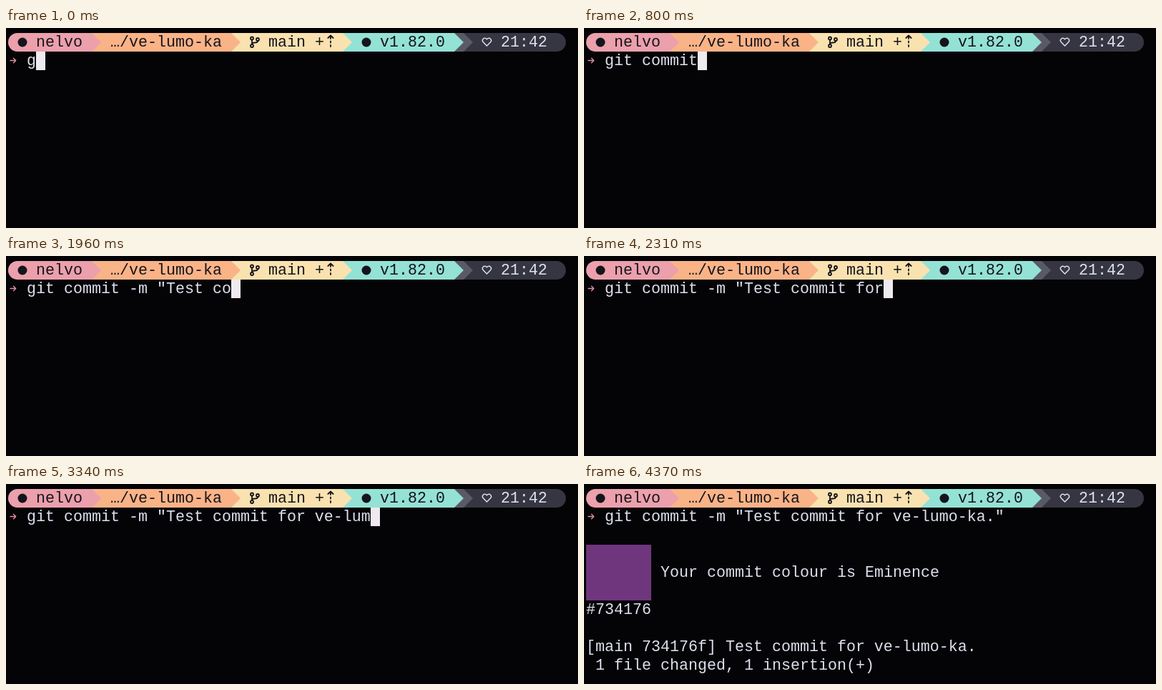
Write an HTML page that moves like this. It is 800 px wide and 280 px high and loops after 8000 ms.

```html
<!DOCTYPE html>
<html lang="en">
<head>
<meta charset="utf-8">
<title>Terminal commit</title>
<style>
  html, body { margin: 0; width: 100%; height: 100%; overflow: hidden; background: #040406; }
  svg { display: block; width: 100%; height: 100%; }
  text { font: 21.663px "Liberation Mono", monospace; white-space: pre; fill: #dde0ee; }
  .dark text { fill: #15141c; }
  .line { fill: none; stroke-width: 1.8; stroke-linecap: round; stroke-linejoin: round; }
</style>
</head>
<body>
<svg id="stage" viewBox="0 0 800 280" xmlns="http://www.w3.org/2000/svg"></svg>
<script>
const LOOP = 8000, CELL = 13, ROW = 26, LEFT = 3, TOP = 7;
const INK = "#15141c", PALE = "#dde0ee";
const USER = "nelvo", PROJECT = "ve-lumo-ka";
const MESSAGE = `Test commit for ${PROJECT}.`;
const COMMAND = `git commit -m "${MESSAGE}"`;

const stage = document.getElementById("stage");
const colX = c => LEFT + c * CELL;
const rowY = r => TOP + r * ROW;

function add(parent, tag, attrs, content) {
  const el = document.createElementNS("http://www.w3.org/2000/svg", tag);
  for (const key in attrs) el.setAttribute(key, attrs[key]);
  if (content) el.textContent = content;
  parent.appendChild(el);
  return el;
}
const group = cls => add(stage, "g", cls ? { class: cls } : {});
const write = (parent, col, row, s) =>
  add(parent, "text", { x: colX(col), y: rowY(row) + 19 }, s);
const line = (parent, d, stroke) => add(parent, "path", { d, stroke, class: "line" });

// Prompt bar: later segments lie underneath the arrow tips of earlier ones.
function drawBar() {
  const bar = group("dark");
  const mid = TOP + ROW / 2, end = TOP + ROW;
  add(bar, "path", {
    fill: "#363542",
    d: `M${colX(49)} ${TOP}H${colX(59)}a13 13 0 0 1 0 26H${colX(49)}Z`
  });
  const segments = [
    [48, 49, "#5a5a66"], [36, 48, "#94e2d5"], [24, 36, "#f9e2af"], [9, 24, "#fab387"]
  ];
  for (const [from, to, fill] of segments)
    add(bar, "path", {
      fill, d: `M${colX(from)} ${TOP}H${colX(to)}L${colX(to + 1)} ${mid}L${colX(to)} ${end}H${colX(from)}Z`
    });
  add(bar, "path", {
    fill: "#eba0ac",
    d: `M${colX(1)} ${TOP}H${colX(9)}L${colX(10)} ${mid}L${colX(9)} ${end}H${colX(1)}a13 13 0 0 1 0-26Z`
  });

  for (const x of [23, 504])
    add(bar, "circle", { cx: x, cy: mid, r: 6.5, fill: INK });
  write(bar, 3, 0, USER);
  write(bar, 11, 0, "…/" + PROJECT);
  write(bar, 28, 0, "main +");
  write(bar, 40, 0, "v1.82.0");

  // Branch
  for (const [cx, cy] of [[344, 14.5], [352, 16], [344, 25]])
    add(bar, "circle", { cx, cy, r: 2, class: "line", stroke: INK });
  line(bar, "M344 16.8V22.8M352 18.2Q352 20.5 348 20.5Q344 20.5 344 22.6", INK);
  // Dashed up arrow
  line(bar, "M450.3 14L454 10.5L457.7 14M454 11V15M454 18.5V20.5M454 24V26", INK);

  const clock = group();
  line(clock, "M672.5 25L667.4 19.8C664.5 16.5 669 11.7 672.5 15.7C676 11.7 680.5 16.5 677.6 19.8Z", PALE)
    .style.strokeWidth = 1.5;
  write(clock, 53, 0, "21:42");
}

drawBar();
line(stage, "M6 45.5H13.5M10.5 42.3L13.7 45.5L10.5 48.7", "#e08ea2").style.strokeWidth = 1.4;
const typed = write(stage, 2, 1, "");
const cursor = add(stage, "rect", { width: CELL, height: ROW, fill: "#efeaf0" });

const swatch = group();
add(swatch, "rect", { x: LEFT, y: rowY(3), width: 7 * CELL, height: 3 * ROW, fill: "#6f367e" });
write(swatch, 8, 4, "Your commit colour is Eminence");
write(swatch, 0, 6, "#734176");

const result = group();
write(result, 0, 8, `[main 734176f] ${MESSAGE}`);
write(result, 0, 9, " 1 file changed, 1 insertion(+)");

// Bursts of typing: [first key time, last key time, characters typed by then]
const BURSTS = [
  [30, 800, 10], [840, 980, 14], [1250, 1250, 15], [1350, 1960, 22],
  [2070, 2310, 30], [2480, 2480, 31], [2800, 2800, 32], [2870, 3000, 36],
  [3170, 3730, 40], [3830, 3930, 43]
];
const ENTER = 4260, SWATCH = 4320, DONE = 4370;

function typedCount(t) {
  let count = 1;
  for (const [from, to, total] of BURSTS) {
    if (t < from) break;
    const keys = total - count;
    const gap = keys > 1 ? (to - from) / (keys - 1) : 1;
    count += Math.min(keys, 1 + Math.floor((t - from) / gap + 1e-6));
    if (count < total) break;
  }
  return count;
}

function show(el, on) {
  el.setAttribute("visibility", on ? "visible" : "hidden");
}

function render(t) {
  const n = typedCount(t), entered = t >= ENTER;
  typed.textContent = COMMAND.slice(0, n);
  cursor.setAttribute("x", colX(entered ? 0 : 2 + n));
  cursor.setAttribute("y", rowY(entered ? 2 : 1));
  show(cursor, t < SWATCH);
  show(swatch, t >= SWATCH);
  show(result, t >= DONE);
}

const start = performance.now();
function tick() {
  render((performance.now() - start) % LOOP);
  requestAnimationFrame(tick);
}
render(0);
requestAnimationFrame(tick);
</script>
</body>
</html>
```
